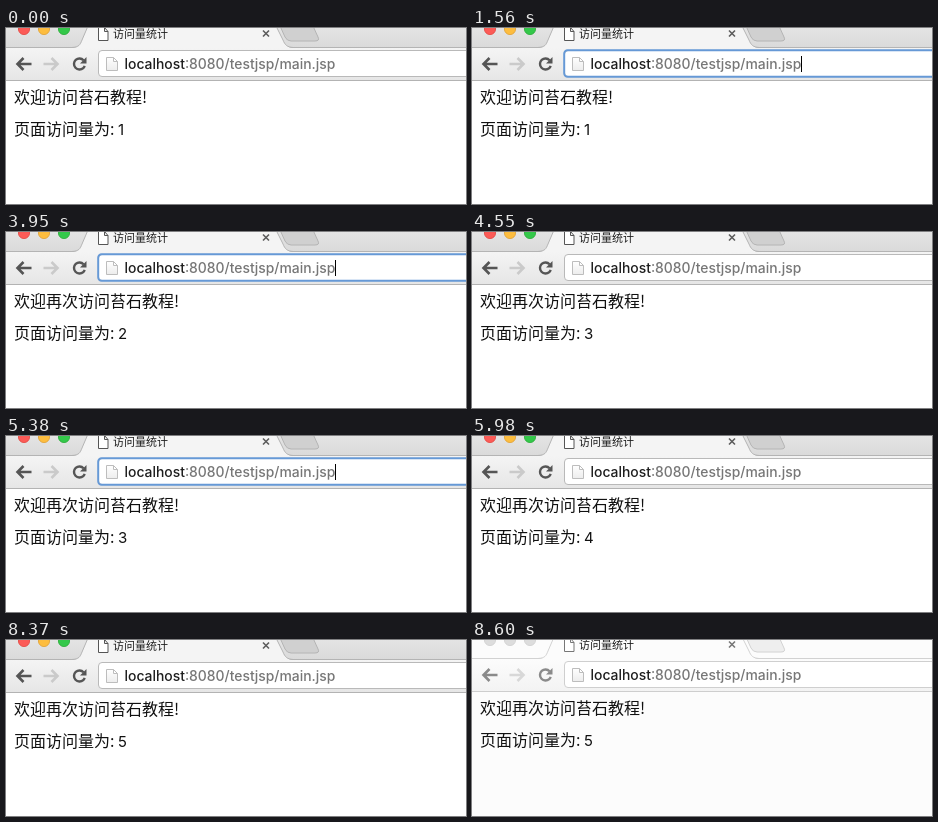
These frames come from a looping animation (460x176 px, 8.96 s). An HTML page with a canvas:

```html
<!DOCTYPE html>
<html lang="zh">
<head>
<meta charset="utf-8">
<title>访问量统计</title>
<style>
html, body { margin: 0; width: 100%; height: 100%; overflow: hidden; background: #fff; }
canvas { display: block; width: 460px; height: 176px; }
</style>
</head>
<body>
<canvas id="stage"></canvas>
<script>
const W = 460, H = 176, LOOP = 8960;
const CJK = '"Noto Sans CJK SC", "Noto Sans CJK", sans-serif';
const UI = 'Inter, Roboto, sans-serif';
const canvas = document.getElementById('stage');
const ctx = canvas.getContext('2d');
const dpr = window.devicePixelRatio || 1;
canvas.width = W * dpr;
canvas.height = H * dpr;

const LOADS = [2390, 4550, 5980, 7290];
const FOCUS = [[1560, 2390], [3950, 4550], [5380, 5980], [6820, 7290]];

function stateAt(t) {
  return {
    visits: 1 + LOADS.filter(at => t >= at).length,
    focus: FOCUS.some(([from, to]) => t >= from && t < to),
    pointer: t >= 8250 && t < 8370,
    active: t < 8600
  };
}

function shape(d, fill, stroke, width = 1) {
  const p = new Path2D(d);
  if (fill) { ctx.fillStyle = fill; ctx.fill(p); }
  if (stroke) { ctx.strokeStyle = stroke; ctx.lineWidth = width; ctx.stroke(p); }
}

function text(str, x, y, font, color) {
  ctx.font = font;
  ctx.fillStyle = color;
  ctx.fillText(str, x, y);
  return x + ctx.measureText(str).width;
}

function fade(y0, y1, from, to) {
  const g = ctx.createLinearGradient(0, y0, 0, y1);
  g.addColorStop(0, from);
  g.addColorStop(1, to);
  return g;
}

function roundBox(x, y, w, h, r) {
  ctx.beginPath();
  ctx.roundRect(x, y, w, h, r);
}

function drawTabs(active) {
  ctx.fillStyle = active ? fade(0, 20, '#e4e4e4', '#dadada') : '#fcfcfc';
  ctx.fillRect(0, -2, W, 22);

  const lights = active
    ? [['#fc5b57', '#e2463f'], ['#fdbd3f', '#e0a033'], ['#34c84a', '#27aa35']]
    : Array(3).fill(['#dddddd', '#d0d0d0']);
  lights.forEach(([fill, rim], i) => {
    ctx.beginPath();
    ctx.arc(18 + 20 * i, 1, 5.6, 0, 7);
    ctx.fillStyle = fill;
    ctx.fill();
    ctx.strokeStyle = rim;
    ctx.lineWidth = 0.8;
    ctx.stroke();
  });

  const line = active ? '#b4b4b4' : '#d2d2d2';
  shape('M274 -2L279 9Q281 13 285 13H309Q314 13 312 9L307 -2Z',
    active ? '#d0d0d0' : '#eeeeee', line);
  shape('M0 19.5H460', null, line);
  shape('M66 20C73 19.5 74 17 76 12L82 -2H270L277 12C279 17 281 19.5 287 20Z',
    active ? '#f4f4f4' : '#fcfcfc');
  shape('M66 19.5C73 19 74 17 76 12L82 -2M270 -2L277 12C279 17 281 19 287 19.5', null, line);

  const ink = active ? '#555' : '#777';
  shape('M92.5 -0.5H98.5L102 3.5V12.5H92.5ZM98.5 -0.5V3.5H102', '#fff', ink);
  text('访问量统计', 107, 10, '11px ' + CJK, '#1c1c1c');
  shape('M257 2.5L263 8.5M263 2.5L257 8.5', null, active ? '#5c5c5c' : '#777', 1.6);
}

function drawArrow(x, dir, color) {
  ctx.save();
  ctx.translate(x, 36);
  ctx.scale(dir, 1);
  shape('M-0.5 -6L-6.5 0L-0.5 6M-6 0H7.5', null, color, 2.6);
  ctx.restore();
}

function drawToolbar({ active, focus }) {
  ctx.fillStyle = active ? fade(20, 52, '#f4f4f4', '#e6e6e6') : fade(20, 52, '#fcfcfc', '#f3f3f3');
  ctx.fillRect(0, 20, W, 32);
  ctx.fillStyle = active ? '#b3b3b3' : '#cecece';
  ctx.fillRect(0, 52, W, 1);

  const ink = active ? '#555' : '#8a8a8a';
  drawArrow(18, 1, ink);
  drawArrow(45, -1, active ? '#cacaca' : '#d8d8d8');
  ctx.beginPath();
  ctx.arc(73.5, 36, 5.5, -0.75, 0.35, true);
  ctx.strokeStyle = ink;
  ctx.lineWidth = 2.4;
  ctx.stroke();
  shape('M80.5 29V35.5H74Z', ink);

  roundBox(92.5, 22.5, 390, 26, 3.5);
  ctx.fillStyle = '#fff';
  ctx.fill();
  ctx.strokeStyle = active ? '#b9b9b9' : '#cfcfcf';
  ctx.lineWidth = 1;
  ctx.stroke();
  if (focus) {
    roundBox(92.2, 22.2, 390, 26.6, 3.5);
    ctx.strokeStyle = '#6699d6';
    ctx.lineWidth = 2;
    ctx.stroke();
  }

  shape('M100.5 29.5H107.5L111.5 33.5V42.5H100.5ZM107.5 29.5V33.5H111.5',
    fade(29, 43, '#ffffff', '#ececec'), '#bdbdbd');
  const font = '500 13.9px ' + UI;
  const mid = text('localhost', 118.5, 41, font, '#1e1e1e');
  const end = text(':8080/testjsp/main.jsp', mid, 41, font, '#777');
  if (focus) {
    ctx.fillStyle = '#000';
    ctx.fillRect(Math.round(end), 28, 1, 16);
  }
}

function drawPage(visits) {
  const font = '16px ' + CJK;
  const greeting = visits > 1 ? '欢迎再次访问' : '欢迎访问';
  text(greeting + '苔石教程!', 8, 75, font, '#111');
  const end = text('页面访问量为: ', 8, 107, font, '#111');
  text(visits, end, 106.5, '15px ' + UI, '#111');
}

function draw(t) {
  const state = stateAt(t);
  ctx.setTransform(dpr, 0, 0, dpr, 0, 0);
  ctx.fillStyle = state.active ? '#fff' : '#fcfcfc';
  ctx.fillRect(0, 0, W, H);
  ctx.save();
  if (!state.active) ctx.translate(0, -1);
  drawTabs(state.active);
  drawToolbar(state);
  drawPage(state.visits);
  ctx.restore();
  if (state.pointer) shape('M450 168.5V184L458 176.5Z', '#000', '#ddd', 0.8);
}

const start = performance.now();
function tick() {
  draw((performance.now() - start) % LOOP);
  requestAnimationFrame(tick);
}
draw(0);
requestAnimationFrame(tick);
</script>
</body>
</html>
```
